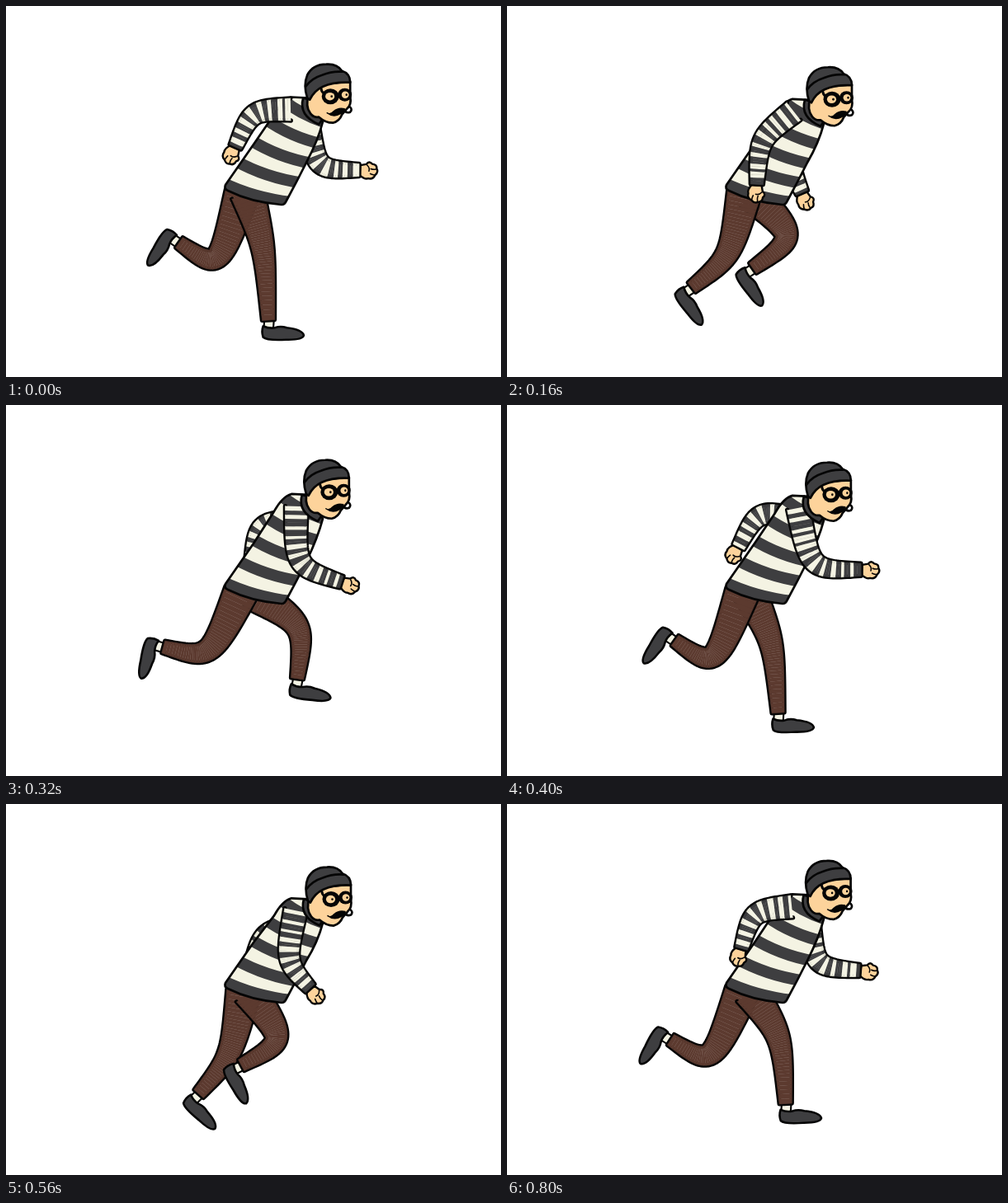
Write an HTML page with a canvas that moves like this. It is 600x450 px and loops after 0.84 s.

```html
<!DOCTYPE html>
<html lang="en">
<head>
<meta charset="utf-8">
<title>Running burglar</title>
<style>
html, body { margin: 0; width: 100%; height: 100%; overflow: hidden; background: #fff; }
canvas { display: block; }
</style>
</head>
<body>
<canvas id="stage" width="600" height="450"></canvas>
<script>
const ctx = document.getElementById('stage').getContext('2d');
const LOOP = 840, STEP = 40, LINE = 2.7;
const INK = '#050505', GREY = '#3e3e40', CREAM = '#f4f3e3', BROWN = '#5c3a2f', SKIN = '#fdd39b';
const { PI, cos, sin, hypot, atan2 } = Math;

// Mean value plus cosine and sine weights of each harmonic
function wave(phase, mean, ...weights) {
  return weights.reduce((sum, w, i) => {
    const angle = phase * (1 + (i >> 1));
    return sum + w * (i % 2 ? sin(angle) : cos(angle));
  }, mean);
}

function shape(d, fill, width = LINE) {
  const path = new Path2D(d);
  if (fill) {
    ctx.fillStyle = fill;
    ctx.fill(path);
  }
  if (width) {
    ctx.strokeStyle = INK;
    ctx.lineWidth = width;
    ctx.stroke(path);
  }
}

function oval(x, y, rx, ry, fill) {
  ctx.fillStyle = fill;
  ctx.beginPath();
  ctx.ellipse(x, y, rx, ry, 0, 0, 2 * PI);
  ctx.fill();
}

function at(x, y, angle, draw, size = 1) {
  ctx.save();
  ctx.translate(x, y);
  ctx.rotate(angle);
  ctx.scale(size, size);
  draw();
  ctx.restore();
}

function polyline(points) {
  const path = new Path2D();
  points.forEach(p => path.lineTo(...p));
  return path;
}

// Tapered tube bent around b; points are x, y, radius. The start stays open.
function limb(a, b, c, paint) {
  const n = 40, spine = [], left = [], right = [];
  const bend = b.map((v, k) => k < 2 ? v + (v - (a[k] + c[k]) / 2) * 0.2 : v);
  for (let i = 0; i <= n; i++) {
    const t = i / n, s = 1 - t;
    spine.push(a.map((v, k) => s ** 3 * v + 3 * s * t * bend[k] + t ** 3 * c[k]));
  }
  spine.forEach(([x, y, r], i) => {
    const p = spine[Math.max(0, i - 1)], q = spine[Math.min(n, i + 1)];
    const dx = q[0] - p[0], dy = q[1] - p[1], k = r / hypot(dx, dy);
    left.push([x - dy * k, y + dx * k]);
    right.push([x + dy * k, y - dx * k]);
  });
  ctx.strokeStyle = INK;
  ctx.lineWidth = 2 * LINE;
  ctx.stroke(polyline([...left, ...right.slice().reverse()]));
  ctx.lineWidth = 0.6;
  let length = 0;
  for (let i = 0; i < n; i++) {
    const piece = polyline([left[i], left[i + 1], right[i + 1], right[i]]);
    ctx.fillStyle = ctx.strokeStyle = paint(length);
    ctx.fill(piece);
    ctx.stroke(piece);
    length += hypot(spine[i + 1][0] - spine[i][0], spine[i + 1][1] - spine[i][1]);
  }
}

function foot() {
  shape('M-5,-3 L-5,12 L7,12 L7,-3 Z', CREAM, 2.2);
  shape('M-6,8 Q2,11 9,9 Q16,6 24,8 Q44,9 46,16 Q45,22 24,23 Q0,26 -5,22 Q-8,15 -6,8 Z', GREY);
}

function leg(phase) {
  const kx = wave(phase, 298, 28, -51, -14, -4);
  const ky = wave(phase, 292, -8, 15, 10, 8);
  const ax = wave(phase, 265, 54, -61, -1, -7);
  const ay = wave(phase, 326, 40, 5, 8, 14, 7, 3);
  at(ax, ay, atan2(ay - ky, ax - kx) - 1.43, foot, 0.96);
  limb([290 + (kx - 290) * 0.13, 228, 20], [kx, ky, 12.5], [ax, ay, 7.5], () => BROWN);
}

function fist() {
  shape('M-5,-6 L2,-8 Q5,-13 9,-9 Q15,-9 15,-4 Q18,0 14,4 Q12,10 6,9 Q2,11 -5,6 Z', SKIN, 2.4);
  shape('M8,-3 Q11,-2 14,-3 M8,3 Q11,4 13,4 M3,-7 Q7,-4 6,0', null, 1.6);
}

function arm(phase, shoulder, shift = 0) {
  const ex = wave(phase, 328, -36, 0, 8) + shift;
  const ey = wave(phase, 169, -32, 0, -7);
  const wx = wave(phase, 343, -75, 0, 10, -8);
  const wy = wave(phase, 206, -14, 0, -21);
  at(wx, wy, atan2(wy - ey, wx - ex), () => at(6, 0, 0, fist));
  limb(shoulder, [ex, ey, 11.5], [wx, wy, 7.5], d => (d + 8) % 11.5 < 6 ? GREY : CREAM);
}

function torso(dy) {
  const d = `M346,${112 + dy} Q335,${115 + dy} 325,${133 + dy} L300,168 L266,217 Q264,222 269,224
    Q297,238 334,241 Q338,241 340,236 Q352,214 364,190 Q378,${165 + dy} 384,${142 + dy} L366,${113 + dy} Z`;
  shape(d, CREAM, 0);
  ctx.save();
  ctx.clip(new Path2D(d));
  ctx.strokeStyle = GREY;
  ctx.lineWidth = 14;
  for (let i = 0; i < 5; i++) {
    const rise = dy * i / 4;
    const x0 = 260 + 18 * i, y0 = 213 - 25 * i + rise;
    const x1 = 346 + 13 * i, y1 = 238 - 23 * i + rise;
    ctx.beginPath();
    ctx.moveTo(x0, y0);
    ctx.quadraticCurveTo((x0 + x1) / 2 - 4, (y0 + y1) / 2 + 7, x1, y1);
    ctx.stroke();
  }
  ctx.restore();
  shape(d);
}

function head() {
  shape('M368,110 Q363,124 370,133 Q374,138 380,137 Q388,144 397,144 Q405,142 408,134 ' +
    'L414,127 Q420,122 418,112 L418,94 L385,97 Z', SKIN);
  oval(394, 112, 10.5, 9.5, INK);
  oval(411.5, 110, 8.5, 8, INK);
  shape('M386,108 Q383,106 383,103', null, 3);
  oval(393.5, 112, 5.6, 4.8, SKIN);
  oval(412, 110, 4.4, 4.2, SKIN);
  oval(395.5, 112, 1.3, 1.4, INK);
  oval(413.5, 110, 1.2, 1.4, INK);
  shape('M390,132 Q394,135 398,130 Q404,125 411,127 Q411,131 406,133 Q398,138 390,132 Z', INK, 1.5);
  shape('M410,128 Q413,133 418,131 Q421,128 418,125', null, 2.6);
  shape('M366,114 Q361,98 366,86 Q373,73 389,73 Q402,72 408,81 Q418,84 418,95 ' +
    'Q398,94 385,100 Q374,105 369,116 Z', GREY);
  shape('M364,100 Q371,90 384,86 Q396,81 409,82', null);
}

function draw(time) {
  const phase = 2 * PI * time / LOOP;
  // Two bobs per loop, rising faster than falling
  const bob = 6.5 * sin(2 * phase + 0.3 + 0.6 * cos(2 * phase - 4)) - 1.7;
  const dx = Math.min(0, bob) * 0.35, dy = bob * 0.65;
  ctx.clearRect(0, 0, 600, 450);
  ctx.lineJoin = ctx.lineCap = 'round';
  leg(phase + PI);
  leg(phase);
  arm(phase + PI, [367, 145 + dy, 12], 8);
  torso(dy);
  arm(phase, [349 - 4 * cos(phase), 127 + dy, 13.5]);
  at(dx, dy, 0, () => shape('M361,113 Q355,134 380,145 L385,138 L372,116 Z', GREY));
  at(dx, bob, 0, head);
}

function tick(now) {
  draw(Math.floor(now % LOOP / STEP) * STEP);
  requestAnimationFrame(tick);
}
tick(0);
</script>
</body>
</html>
```
